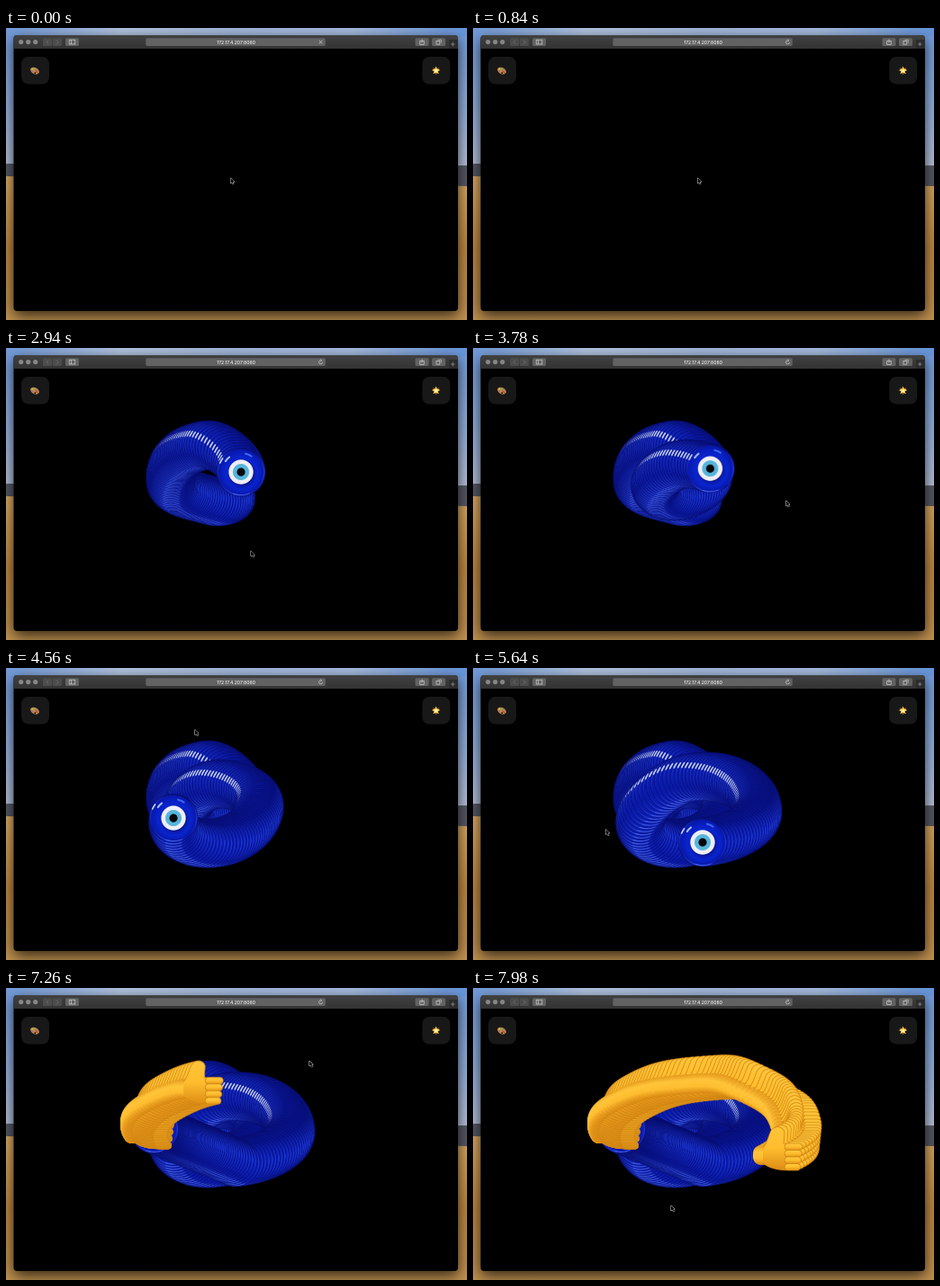
Animation, 512 px wide and 325 px high, one loop 8 s. Source, as an HTML page with a canvas:

```html
<!DOCTYPE html>
<html lang="en">
<head>
<meta charset="utf-8">
<title>Emoji trail</title>
<style>
  html, body { margin: 0; width: 100%; height: 100%; overflow: hidden; background: #000; }
  canvas { display: block; width: 512px; height: 325px; }
</style>
</head>
<body>
<canvas id="stage"></canvas>
<script>
const W = 512, H = 325, LOOP = 8000, STEP = 60, STAMP_EVERY = 15, TAU = Math.PI * 2;
const LOADED = 600, APPEAR = 1020, START = 1680, GLIDE = 5640, CLICK = 6480, SWAP = 6660;
const LAG = 440; // how far, in ms, the emoji trails behind the pointer
const home = [153, 152];

// Turning points as [time, x, y], about a quarter turn apart; the last one only steers the exit.
const loops = [
  [START, 249.5, 167], [1860, 228, 170], [2200, 183, 148], [2720, 223, 108], [2940, 261, 138],
  [3160, 230, 164], [3420, 203, 150], [3680, 242, 129], [3960, 281, 157], [4300, 230, 195],
  [4560, 186, 167], [4820, 248, 121], [5260, 316, 158], [GLIDE, 255, 194], [6000, 195, 172]
];
const sweep = [
  [6720, 159, 157], [7080, 172, 124], [7380, 257, 102], [7600, 322, 113],
  [7800, 359, 150], [7980, 339, 181], [8160, 297, 182]
];

// Hermite curve whose tangents make quarter-turn points join into round arcs.
function along(path, t) {
  const last = path.length - 1;
  if (t <= path[0][0]) return path[0].slice(1);
  const i = path.findIndex(p => p[0] > t) - 1;
  const a = path[i], b = path[i + 1], span = b[0] - a[0], u = (t - a[0]) / span;
  const slope = (k, axis) => {
    if (k === 0 || k === last) return 0;
    const p = path[k - 1], n = path[k + 1];
    return (n[axis] - p[axis]) / (n[0] - p[0]) * span * Math.PI / 2;
  };
  return [1, 2].map(axis => {
    const d = b[axis] - a[axis], m = slope(i, axis), n = slope(i + 1, axis);
    return a[axis] + u * (m + u * (3 * d - 2 * m - n + u * (m + n - 2 * d)));
  });
}

function amuletAt(t) {
  if (t < GLIDE) return along(loops, t);
  const left = Math.exp((GLIDE - t) / LAG), from = along(loops, GLIDE);
  return home.map((h, i) => h + (from[i] - h) * left);
}
const handAt = t => along(sweep, t);

// The emoji chases the pointer, so the pointer lies ahead along the velocity.
function pointerAt(t) {
  if (t >= GLIDE + 180 && t <= sweep[0][0]) return home;
  const at = t < SWAP ? amuletAt : handAt, before = at(t - 1), after = at(t + 1);
  return at(t).map((p, i) => p + (after[i] - before[i]) / 2 * LAG);
}

const canvas = document.getElementById('stage');
const ratio = window.devicePixelRatio || 1;
canvas.width = W * ratio;
canvas.height = H * ratio;
const ctx = canvas.getContext('2d');

function disc(c, x, y, r, fill) {
  c.beginPath();
  c.arc(x, y, r, 0, TAU);
  c.fillStyle = fill;
  c.fill();
}
function box(c, x, y, w, h, r, fill) {
  c.beginPath();
  c.roundRect(x, y, w, h, r);
  c.fillStyle = fill;
  c.fill();
}
function arc(c, x, y, r, from, to, color, width) {
  c.beginPath();
  c.arc(x, y, r, from, to);
  c.strokeStyle = color;
  c.lineWidth = width;
  c.stroke();
}
function line(c, color, width, ...points) {
  c.beginPath();
  points.forEach(p => c.lineTo(...p));
  c.strokeStyle = color;
  c.lineWidth = width;
  c.stroke();
}
function shade(g, ...colors) {
  colors.forEach((color, i) => g.addColorStop(i / (colors.length - 1), color));
  return g;
}
const down = (c, y0, y1, ...colors) => shade(c.createLinearGradient(0, y0, 0, y1), ...colors);

function sprite(paint) {
  const image = document.createElement('canvas');
  image.width = image.height = 128 * ratio;
  const c = image.getContext('2d');
  c.scale(2 * ratio, 2 * ratio);
  c.translate(32, 32);
  c.lineJoin = c.lineCap = 'round';
  paint(c);
  return image;
}

const amulet = sprite(c => {
  disc(c, 0, 0, 27.2, '#050b6a');
  disc(c, 0, 0, 26.6, shade(c.createConicGradient(0, 0, 0),
    '#1c37da', '#0a18a4', '#2843dc', '#0b1899', '#1c34cc', '#0a1590', '#070f7c', '#1c37da'));
  disc(c, 0, 0, 25, shade(c.createRadialGradient(2, 4, 10, 0, 0, 25), '#0718a0', '#0a25cf', '#0818ac'));
  arc(c, 0, 0, 25.4, 3.55, 3.78, '#c9d5ff', 1.6);
  arc(c, 0, 0, 25.6, 1.2, 1.9, '#4762ea', 0.9);
  arc(c, 0, 0, 21, 4.95, 5.3, '#3f68f4', 2);
  arc(c, 0, 0, 21, 3.75, 4.05, '#a9bfff', 2);
  disc(c, 0.5, 0.5, 14.2, '#07138a');
  disc(c, 0, 0, 13.7, '#eeeef6');
  disc(c, 0, 0, 9, '#55b5dc');
  disc(c, 0, 0, 4.6, '#050507');
});

const thumbsUp = sprite(c => {
  const edge = '#d08512';
  box(c, -28, -6, 32, 22, 9, down(c, -6, 16, '#e59a1c', '#ffc53a', '#ffbd30', '#d98812'));
  c.beginPath();
  c.moveTo(-17, -3);
  c.bezierCurveTo(-13, -8, -12, -12, -9, -20);
  c.bezierCurveTo(-6, -29, 6, -28, 7, -20);
  c.lineTo(6, -8);
  c.lineTo(20, -7);
  c.lineTo(19, 21);
  c.quadraticCurveTo(-4, 24, -17, 14);
  c.fillStyle = down(c, -27, 22, '#ffc53a', '#ffbd2e', '#dd8d16');
  c.fill();
  c.strokeStyle = edge;
  c.lineWidth = 0.8;
  c.stroke();
  for (let i = 0; i < 4; i++) {
    const y = -8 + i * 7.5;
    box(c, 7, y, 20 - i * 0.8, 7.5, 3.7, down(c, y, y + 7.5, '#ffcb42', '#ffbd2e', '#e0941a'));
    c.stroke();
  }
});

function drawTrail(image, at, from, to) {
  for (let t = from; t <= to; t += STAMP_EVERY) {
    const [x, y] = at(t);
    ctx.drawImage(image, x - 32, y - 32, 64, 64);
  }
}

function drawDesktop() {
  ctx.fillStyle = down(ctx, 0, 160, '#6f99d8', '#8faddc', '#b9c3da');
  ctx.fillRect(0, 0, W, 180);
  ctx.fillStyle = shade(ctx.createLinearGradient(0, 0, W, 0), '#d5dbe500', '#d5dbe5aa', '#c3ccdb99', '#d5dbe588', '#5b8fdc88');
  ctx.fillRect(0, 0, W, 9);
  box(ctx, -8, 151, 20, 26, 4, '#555765');
  box(ctx, 500, 153, 20, 28, 4, '#555765');
  ctx.fillStyle = down(ctx, 165, H, '#d9aa62', '#bd8742', '#bf9150');
  ctx.beginPath();
  ctx.moveTo(0, 165);
  ctx.lineTo(W, 176);
  ctx.lineTo(W, H);
  ctx.lineTo(0, H);
  ctx.fill();
}

function drawToolbar(loaded) {
  const ink = '#d0d0d0';
  box(ctx, 8.5, 8, 493.5, 15, [4, 4, 0, 0], down(ctx, 8, 23, '#414142', '#333334'));
  for (let i = 0; i < 3; i++) disc(ctx, 16.7 + 8 * i, 15.6, 2.6, '#868686');
  for (const x of [41, 51.8]) box(ctx, x, 11.2, 10.2, 8.8, 1.5, '#4c4c4d');
  for (const x of [66, 454.5, 473]) box(ctx, x, 11.2, 15, 8.8, 1.5, '#626263');
  line(ctx, '#7c7c7c', 0.7, [47, 13.5], [45, 15.6], [47, 17.7]);
  line(ctx, '#7c7c7c', 0.7, [56, 13.5], [58, 15.6], [56, 17.7]);
  ctx.strokeStyle = ink;
  ctx.strokeRect(70.2, 13.2, 6.6, 4.8);
  line(ctx, ink, 0.7, [72.5, 13.2], [72.5, 18]);
  ctx.strokeRect(459.8, 14.5, 4.4, 4.1);
  line(ctx, ink, 0.7, [462, 12.3], [462, 16.5]);
  ctx.strokeRect(478, 14.4, 3.8, 3.8);
  line(ctx, ink, 0.6, [479.5, 13], [483.3, 13], [483.3, 16.8]);
  ctx.fillStyle = '#2c2c2d';
  ctx.fillRect(492, 13, 10, 10);
  line(ctx, '#aaa', 0.6, [494, 18], [498.6, 18]);
  line(ctx, '#aaa', 0.6, [496.3, 15.7], [496.3, 20.3]);

  box(ctx, 155.3, 11.2, 199.5, 8.8, 1.8, '#626263');
  ctx.font = '500 5px Inter, Roboto, sans-serif';
  ctx.textAlign = 'center';
  ctx.fillStyle = '#f2f2f2';
  ctx.fillText('172.17.4.207:8080', 255.5, 17.5);
  if (loaded) {
    arc(ctx, 349.5, 15.8, 2, 0, 5.2, ink, 0.7);
    line(ctx, ink, 0.6, [349.4, 12.6], [350.8, 13.9], [349.4, 15]);
  } else {
    line(ctx, ink, 0.8, [347.7, 13.8], [351.3, 17.4]);
    line(ctx, ink, 0.8, [351.3, 13.8], [347.7, 17.4]);
  }
}

function drawWindow(loaded) {
  ctx.save();
  ctx.shadowColor = 'rgba(0,0,0,.75)';
  ctx.shadowBlur = 16 * ratio;
  ctx.shadowOffsetY = 5 * ratio;
  box(ctx, 8.5, 8, 493.5, 307, 4, '#000');
  ctx.restore();
  drawToolbar(loaded);
}

function star(x, y, points, outer, inner, fill) {
  ctx.beginPath();
  for (let i = 0; i < points * 2; i++) {
    const a = i * Math.PI / points - Math.PI / 2, r = i % 2 ? inner : outer;
    ctx.lineTo(x + r * Math.cos(a), y + r * Math.sin(a));
  }
  ctx.fillStyle = fill;
  ctx.fill();
}

function drawButtons() {
  for (const x of [17, 462.3]) box(ctx, x, 32, 31, 30.5, 8, '#181818');
  ctx.save();
  ctx.translate(32, 47.6);
  ctx.rotate(0.5);
  ctx.beginPath();
  ctx.ellipse(0, 0, 5.2, 3.5, 0, 0, TAU);
  ctx.fillStyle = '#c98b4c';
  ctx.fill();
  disc(ctx, 1.4, 2, 1, '#181818');
  ['#8a4fb5', '#e8c52d', '#55b044', '#3d8fe0', '#d94c45'].forEach((color, i) => {
    const a = 2.3 + i * 0.85;
    disc(ctx, 3.3 * Math.cos(a), 2 * Math.sin(a), 0.8, color);
  });
  ctx.restore();
  line(ctx, '#765036', 0.9, [32, 47], [36, 51]);
  star(477.6, 47.6, 8, 5, 2, '#e88d2a');
  star(477.6, 47.4, 5, 4.6, 2.1, '#ffd95c');
  disc(ctx, 477.6, 47.4, 1.5, '#fff3c0');
}

function drawPointer(t) {
  const [x, y] = pointerAt(t);
  if (t >= CLICK && t < SWAP + STEP) arc(ctx, x, y, 8, 0, TAU, '#15151c', 1);
  ctx.save();
  ctx.translate(x, y);
  ctx.lineJoin = 'round';
  line(ctx, '#f0f0f0', 0.9, [0, 0], [0, 5.8], [1.4, 4.6], [2.4, 6.8], [3.4, 6.4], [2.4, 4.2], [4.2, 4.1], [0, 0]);
  ctx.fillStyle = '#000';
  ctx.fill();
  ctx.restore();
}

function frame(now) {
  const t = Math.floor(now % LOOP / STEP) * STEP;
  ctx.setTransform(ratio, 0, 0, ratio, 0, 0);
  ctx.lineWidth = 0.7;
  ctx.imageSmoothingQuality = 'high';
  drawDesktop();
  drawWindow(t >= LOADED);
  if (t >= APPEAR) drawTrail(amulet, amuletAt, Math.min(t, START), Math.min(t, SWAP - STEP));
  if (t >= SWAP) drawTrail(thumbsUp, handAt, SWAP, t);
  drawButtons();
  drawPointer(t);
  requestAnimationFrame(frame);
}
requestAnimationFrame(frame);
</script>
</body>
</html>
```
